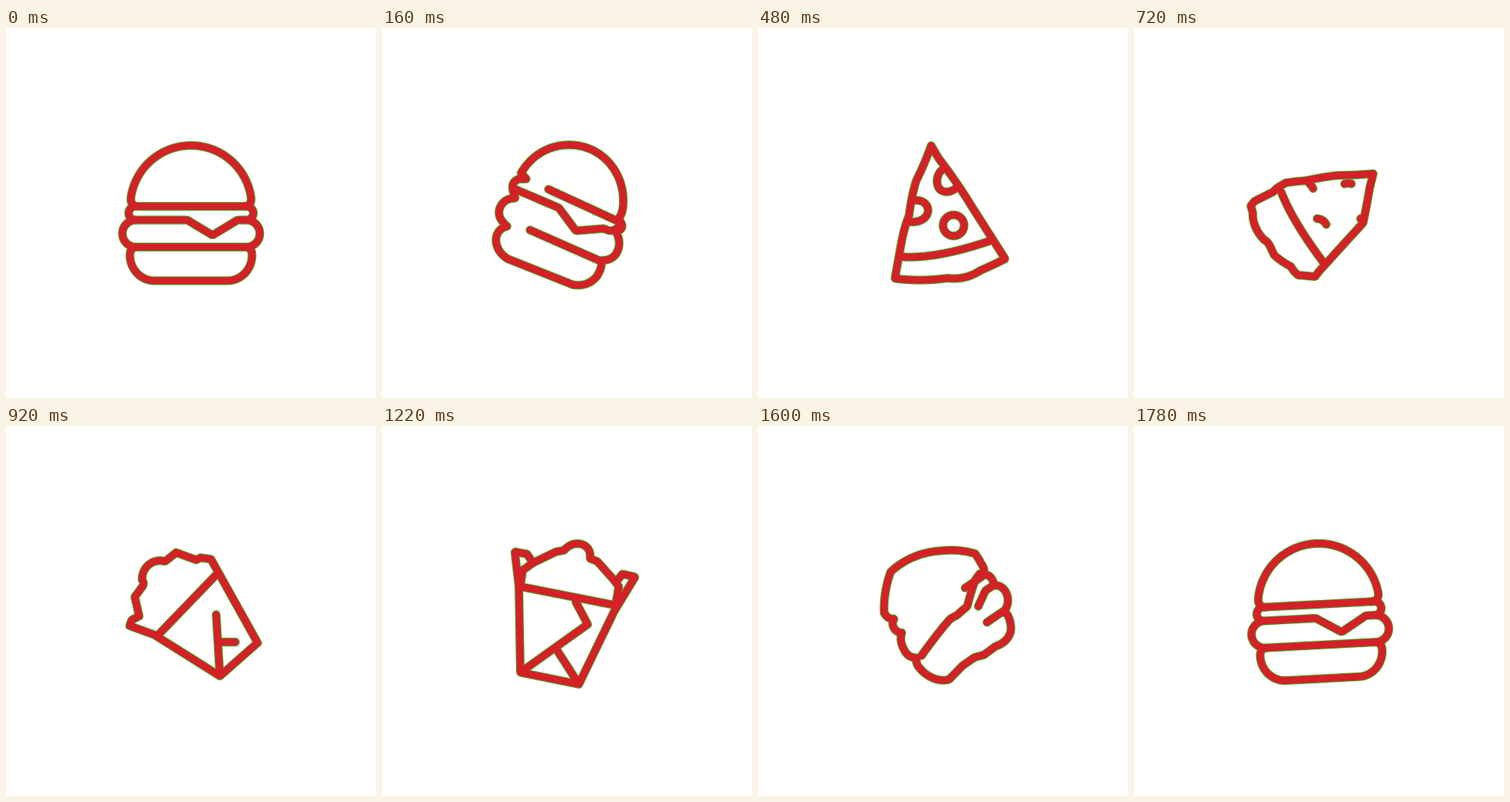
These frames come from a looping animation (500x500 px, 1.8 s). An HTML page with a canvas:

```html
<!DOCTYPE html>
<html lang="en">
<head>
<meta charset="utf-8">
<title>Takeaway loader</title>
<style>
  html, body { margin: 0; width: 100%; height: 100%; overflow: hidden; background: #fff; }
  canvas { display: block; width: 500px; height: 500px; }
</style>
</head>
<body>
<canvas id="stage" width="500" height="500"></canvas>
<script>
const LOOP = 1800, STEP = 20, CENTER = 250;
const RED = '#d42027', GREEN = '#4fae35';
const ctx = document.getElementById('stage').getContext('2d');

// Each shape is drawn as it looks when the whole group is turned by "turn" degrees.
// Lines start at the end from which they grow.
const shapes = {
  burger: {
    turn: 0,
    outline: 'M169 228 A82 82 0 0 1 331 228 Q333 241 320 241 L325 241 A9.25 9.25 0 0 1 325 259.5 ' +
      'A18.25 18.25 0 0 1 324.5 296 L322 296 Q332.5 296 332.5 307 A33 34.5 0 0 1 299 341.5 L201 341.5 ' +
      'A33 34.5 0 0 1 167.5 307 Q167.5 296 178 296 L175.5 296 A18.25 18.25 0 0 1 175.5 259.5 ' +
      'L175 259.5 A9.25 9.25 0 0 1 175 241 L180 241 Q167 241 169 228',
    lines: {
      bun: 'M325 241 L175 241',
      base: 'M322 296 L178 296',
      band: 'M325 259.5 L313 259.5 L279 280 L245 259.5 L175 259.5'
    }
  },
  tilted: {
    turn: 24,
    outline: 'M188 196 C203 170 228 158 253 158 C297 158 327 195 326 235 Q326 250 320 257 L323 263 ' +
      'Q328 272 316 275 Q322 286 320 296 Q316 314 297 314 Q297 326 290 336 Q278 350 258 347 L170 312 ' +
      'Q154 302 154 285 Q156 271 169 268 Q155 256 159 244 Q164 230 180 230 L177 220 Q174 208 185 204 ' +
      'L195 204 L188 196',
    lines: {
      bun: 'M323 263 L225 218',
      base: 'M293 314 L200 273',
      cheese: 'M320 268 Q312 278 300 271 L262 274 L239 243 L178 217'
    }
  },
  pizza: {
    turn: 92,
    outline: 'M234 159 L244 176 Q268 207 290 243 L334 312 Q318 320 300 328 Q280 341 256 338 ' +
      'Q220 343 185 338.5 L192 300 Q197 270 204 254 Q208 224 214 206 Q225 184 234 159',
    lines: {
      band: 'M318 286 C270 303 225 312 192 309',
      slice1: 'M250 191 C241 196 239 213 247 219 Q257 225 268 216',
      slice2: 'M210 233 C237 230 237 264 206 262',
      slice3: 'M254 257 A14.2 14.2 0 1 1 273 278 A14.2 14.2 0 0 1 254 257'
    }
  },
  pouch: {
    turn: 180,
    outline: 'M340 293 L289 338 Q245 310 200 282 L167 270 L170 262 L180 257 L174 231 L185 216 ' +
      'Q187 212 184 208 C183 192 198 178 215 183 L230 171 L257 181 L263 178 L277 180 L340 293',
    lines: {
      band: 'M205 283 L286 199',
      fold: 'M289 336 L284 255',
      crease: 'M288 292 L310 292'
    }
  },
  box: {
    turn: 238,
    outline: 'M266 349 L187 333 L185 217 L179.5 170 L196 173 L204 185 L235 170 L246 168 ' +
      'Q254 159 264 159 C276 159 283 168 281 179 L291 183 L316 211 L325 200 L342 204 L314 250 L266 349',
    lines: {
      band: 'M187 217 L314 242',
      fold: 'M187 333 L278 268 L262 238',
      crease: 'M236 302 L266 349',
      flap1: 'M204 185 L190 195 L187 217',
      flap2: 'M314 209 L320 217 L316 240'
    }
  },
  crumpled: {
    turn: 297,
    outline: 'M168 266 Q170 240 165 217 Q200 195 222 183 L254 158 L261 170 L266 174 Q276 178 288 188 ' +
      'C300 182 308 188 318 212 Q330 236 332 244 Q332 256 316 265 L310 280 L298 283 L291 298 L292 320 ' +
      'Q290 322 275 319 C245 312 230 305 224 293 Q215 284 168 266',
    lines: {
      band: 'M243 175 Q252 210 271 238 Q272 270 287 312',
      fold: 'M166 217 L211 242',
      crease: 'M193 236 L185 246',
      flap1: 'M262 175 L254 165 L245 172',
      flap2: 'M291 304 L284 312 L276 317'
    }
  }
};

// time, group turn, shape
const poses = [
  [0, 0, 'burger'], [160, 24, 'tilted'], [480, 92, 'pizza'], [580, 112, 'pizza'],
  [920, 180, 'pouch'], [1160, 226, 'box'], [1220, 238, 'box'], [1440, 297, 'crumpled'],
  [1740, 351, 'burger'], [1800, 360, 'burger']
];

const lerp = (a, b, k) => a + (b - a) * k;
const clamp = v => Math.max(0, Math.min(1, v));

function turnPoint(x, y, deg) {
  const a = deg * Math.PI / 180, c = Math.cos(a), s = Math.sin(a);
  return [x * c - y * s, x * s + y * c];
}

function sample(d, turn, count) {
  const path = document.createElementNS('http://www.w3.org/2000/svg', 'path');
  path.setAttribute('d', d);
  const len = path.getTotalLength();
  return Array.from({ length: count + 1 }, (_, i) => {
    const p = path.getPointAtLength(len * i / count);
    return turnPoint(p.x - CENTER, p.y - CENTER, -turn);
  });
}

for (const s of Object.values(shapes)) {
  s.edge = sample(s.outline, s.turn, 400);
  s.strokes = {};
  for (const name in s.lines) s.strokes[name] = sample(s.lines[name], s.turn, 64);
}
// The cheese is the same line as the band of the resting burger.
shapes.burger.strokes.cheese = shapes.burger.strokes.band;

const blend = (a, b, k) => a.map((p, i) => [lerp(p[0], b[i][0], k), lerp(p[1], b[i][1], k)]);
const trim = (pts, part) => pts.slice(0, Math.ceil(pts.length * clamp(part)));

function strokesAt(a, b, k) {
  const out = [];
  for (const name of new Set([...Object.keys(a), ...Object.keys(b)])) {
    const from = a[name], to = b[name];
    if (from && to) out.push(blend(from, to, k));
    else if (from) out.push(trim(from, 1 - k * 2));
    else out.push(trim(to, (k - 0.4) / 0.6));
  }
  return out.filter(pts => pts.length > 1);
}

function trace(path, pts) {
  pts.forEach((p, n) => n ? path.lineTo(p[0], p[1]) : path.moveTo(p[0], p[1]));
}

function stroke(path, color, width) {
  ctx.strokeStyle = color;
  ctx.lineWidth = width;
  ctx.stroke(path);
}

function draw(t) {
  const i = poses.findIndex((p, n) => t < poses[n + 1][0]);
  const [t0, r0, s0] = poses[i], [t1, r1, s1] = poses[i + 1];
  const k = (t - t0) / (t1 - t0), a = shapes[s0], b = shapes[s1];

  const edge = new Path2D(), inner = new Path2D();
  trace(edge, blend(a.edge, b.edge, k));
  edge.closePath();
  for (const pts of strokesAt(a.strokes, b.strokes, k)) trace(inner, pts);

  ctx.setTransform(1, 0, 0, 1, 0, 0);
  ctx.fillStyle = '#fff';
  ctx.fillRect(0, 0, 500, 500);
  ctx.save();
  ctx.translate(CENTER, CENTER);
  ctx.rotate(lerp(r0, r1, k) * Math.PI / 180);
  ctx.lineJoin = ctx.lineCap = 'round';
  stroke(edge, GREEN, 11.8);
  // Inner lines stay inside the silhouette while it changes.
  ctx.save();
  ctx.clip(edge);
  stroke(inner, GREEN, 11.8);
  ctx.restore();
  stroke(edge, RED, 9.6);
  ctx.clip(edge);
  stroke(inner, RED, 9.6);
  ctx.restore();
}

const start = performance.now();
function tick() {
  const t = (performance.now() - start) % LOOP;
  draw(Math.floor(t / STEP) * STEP);
  requestAnimationFrame(tick);
}
tick();
</script>
</body>
</html>
```
